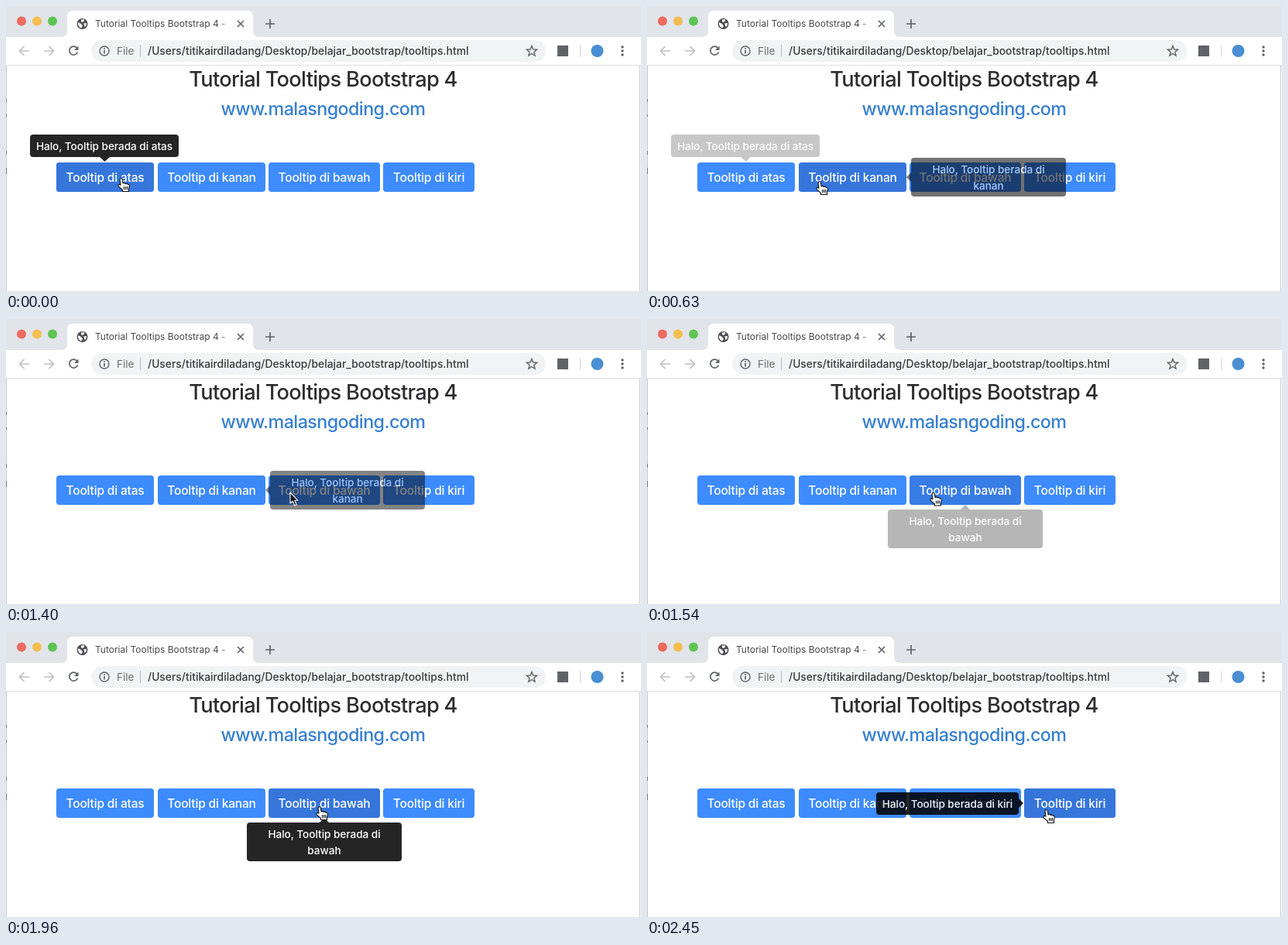
Write an HTML page that moves like this. It is 820 px wide and 368 px high and loops after 2520 ms.

```html
<!DOCTYPE html>
<html lang="id">
<head>
<meta charset="utf-8">
<title>Tutorial Tooltips Bootstrap 4</title>
<style>
  html, body { margin: 0; width: 100%; height: 100%; overflow: hidden; background: #fff; }
  svg { display: block; }
  text { font-family: Inter, Roboto, sans-serif; font-optical-sizing: none; white-space: pre; }
  .line { fill: none; stroke: #5f6368; stroke-width: 1.7; }
  .file { font-size: 13.6px; fill: #6b6f74; }
  .path { font-size: 13.8px; font-weight: 500; letter-spacing: .03px; fill: #37393c; }
  .btn { font-size: 15.5px; font-weight: 500; letter-spacing: -.17px; fill: #fff; text-anchor: middle; }
  .tip { font-size: 13.6px; font-weight: 500; letter-spacing: -.03px; fill: #fff; text-anchor: middle; }
  .head { font-weight: 500; text-anchor: middle; }
</style>
</head>
<body>
<svg width="820" height="368">
  <defs>
    <linearGradient id="fade"><stop stop-color="#fff" stop-opacity="0"/><stop offset="1" stop-color="#fff"/></linearGradient>
  </defs>

  <!-- window and tab strip -->
  <path fill="#e1e4e9" d="M0 0H820V40H0Z"/>
  <path fill="#fff" d="M71 40Q79 40 79 32V14Q79 6 87 6H311Q319 6 319 14V32Q319 40 327 40Z"/>
  <circle cx="20" cy="19.500" r="6" fill="#ed6a5f"/>
  <circle cx="40" cy="19.500" r="6" fill="#f5be50"/>
  <circle cx="60" cy="19.500" r="6" fill="#5fc454"/>
  <circle cx="98.500" cy="23" r="7" fill="#4a4d51"/>
  <path fill="#fff" d="M93 21L97 23L99 26L97 28.500Q92.500 26.500 93 21ZM97 17.500L101 17.300L101 19.500L98.500 21L97 20ZM100 22.500L104 22L103.500 25.500L101.500 27L101 24.500Z"/>
  <text x="115" y="27" font-size="12" fill="#45484c">Tutorial Tooltips Bootstrap 4 -</text>
  <rect x="274" y="12" width="20" height="22" fill="url(#fade)"/>
  <path class="line" d="M299 19L307 27M307 19L299 27M335 23H347M341 17V29"/>

  <!-- toolbar -->
  <path class="line" style="stroke:#bdc0c4" d="M30 58H18M23.500 52L17.500 58L23.500 64M49 58H61M55.500 52L61.500 58L55.500 64"/>
  <path class="line" d="M91.500 54A5.500 5.500 0 1 0 92.500 59.500"/>
  <path fill="#5f6368" d="M93.500 51.500V57H88Z"/>
  <rect x="110" y="44" width="587" height="28" rx="14" fill="#f1f3f4"/>
  <circle class="line" cx="127" cy="58" r="6" style="stroke-width:1.400"/>
  <path class="line" d="M127 57V61.500M127 54.300V55.900"/>
  <text class="file" x="143" y="63">File</text>
  <path stroke="#b4b8bc" d="M173.500 50V66"/>
  <text class="path" x="183" y="63">/Users/titikairdiladang/Desktop/belajar_bootstrap/tooltips.html</text>
  <path class="line" style="stroke-width:1.400" d="M679 51.500L680.800 56L685.600 56.300L681.900 59.400L683.100 64.100L679 61.500L674.900 64.100L676.100 59.400L672.400 56.300L677.200 56Z"/>
  <rect x="712" y="51" width="14" height="14" fill="#5f6368"/>
  <path stroke="#d6d9dc" d="M741.500 50V66"/>
  <circle cx="763.500" cy="58" r="8" fill="#4a8fd2"/>
  <g fill="#5f6368"><circle cx="796" cy="53" r="1.700"/><circle cx="796" cy="58" r="1.700"/><circle cx="796" cy="63" r="1.700"/></g>
  <path stroke="#dcdee0" d="M0 76.500H820"/>
  <path stroke="#c9c9c9" d="M.5 77V368M818.500 77V368"/>
  <path stroke="#777" d="M.5 120V124M.5 140V143M.5 187V192M.5 209V217"/>

  <!-- page -->
  <text class="head" x="409.500" y="104" font-size="27.200" letter-spacing="-.690" fill="#2b2d2f">Tutorial Tooltips Bootstrap 4</text>
  <text class="head" x="409.500" y="141" font-size="23.300" letter-spacing="-.580" fill="#367fd0">www.malasngoding.com</text>
  <g id="buttons"></g>
  <g id="tips"></g>
  <g id="cursor" stroke="#111" stroke-width="1.100" stroke-linejoin="round" fill="#fff">
    <path id="hand" d="M-2 1.500C-2-.8 1.300-.8 1.500 1.500L2 6C3 5 5 5.200 5.300 6.600C6.300 5.800 8 6 8.300 7.400C9.500 7 10.500 7.600 10.400 9.500L9.500 13.500V16.500H1.500V14.500L-3.800 9.800C-5 8-3 6.500-1 8.200ZM3.500 10V14M5.600 10V14M7.700 10V14"/>
    <path id="arrow" d="M0 0V14L3.200 11.200L5.600 16.800L8.200 15.700L5.800 10.300H10Z" fill="#111" stroke="#fff"/>
  </g>
</svg>
<script>
const LOOP = 2520, STEP = 70, TIP_FADE = 150, BUTTON_FADE = 75;
const $ = id => document.getElementById(id);
const clamp = v => Math.max(0, Math.min(1, v));

// button x and width; tooltip box, pointer and lines; hover start and end
const items = [
  { label: 'Tooltip di atas', x: 65, w: 126, box: [31, 166, 192, 29], tip: 'M121 195H134L127.500 201Z',
    lines: ['Halo, Tooltip berada di atas'], on: -TIP_FADE, off: 518 },
  { label: 'Tooltip di kanan', x: 196, w: 139, box: [341, 196, 200, 50], tip: 'M341 215V227L335 221Z',
    lines: ['Halo, Tooltip berada di', 'kanan'], on: 533, off: 1335 },
  { label: 'Tooltip di bawah', x: 339, w: 144, box: [311, 246, 200, 50], tip: 'M405 246H417L411 240Z',
    lines: ['Halo, Tooltip berada di', 'bawah'], on: 1490, off: 2133 },
  { label: 'Tooltip di kiri', x: 487, w: 118, box: [296, 207, 184, 29], tip: 'M480 215V227L486 221Z',
    lines: ['Halo, Tooltip berada di kiri'], on: 2161, off: LOOP }
];

// time, x, y of the pointer
const track = [
  [0, 149, 223], [350, 156, 224], [518, 192, 226], [630, 223, 227], [800, 248, 225], [1120, 255, 223],
  [1260, 278, 223], [1335, 335, 224], [1400, 367, 224], [1680, 373, 225], [1960, 405, 226],
  [2133, 484, 228], [2170, 500, 229], [2450, 516, 230], [LOOP, 516, 230]
];

const rect = (x, y, w, h, fill, extra = '') =>
  `<rect x="${x}" y="${y}" width="${w}" height="${h}" rx="4" fill="${fill}" ${extra}/>`;

$('buttons').innerHTML = items.map(({ label, x, w }) =>
  rect(x, 202, w, 38, '#3d8bfd') + rect(x, 202, w, 38, '#3676db', 'class="hover"') +
  `<text class="btn" x="${x + w / 2}" y="227">${label}</text>`).join('');

$('tips').innerHTML = items.map(({ box, tip, lines }) => {
  const [x, y, w, h] = box;
  const text = lines.map((line, i) =>
    `<text class="tip" x="${x + w / 2}" y="${y + 20 + i * 21}">${line}</text>`).join('');
  return `<g>${rect(x, y, w, h, '#000')}<path d="${tip}"/>${text}</g>`;
}).join('');

const hovers = document.querySelectorAll('.hover');
const tips = $('tips').children;

function pointerAt(t) {
  const i = track.findIndex(p => p[0] > t);
  const [t0, x0, y0] = track[i - 1], [t1, x1, y1] = track[i];
  const k = (t - t0) / (t1 - t0);
  return [x0 + (x1 - x0) * k, y0 + (y1 - y0) * k];
}

const level = (t, { on, off }, fade) =>
  Math.min(clamp((t - on) / fade), 1 - clamp((t - off) / fade));

function draw(now) {
  const t = Math.floor(now % LOOP / STEP + 1e-6) * STEP % LOOP;
  items.forEach((item, i) => {
    hovers[i].style.opacity = level(t, item, BUTTON_FADE);
    tips[i].style.opacity = level(t, item, TIP_FADE) * .85;
  });
  const overTip = t > 1335 && t < 1490;
  $('hand').style.display = overTip ? 'none' : '';
  $('arrow').style.display = overTip ? '' : 'none';
  $('cursor').setAttribute('transform', `translate(${pointerAt(t)})`);
}

const start = performance.now();
function tick() {
  draw(performance.now() - start);
  requestAnimationFrame(tick);
}
tick();
</script>
</body>
</html>
```
